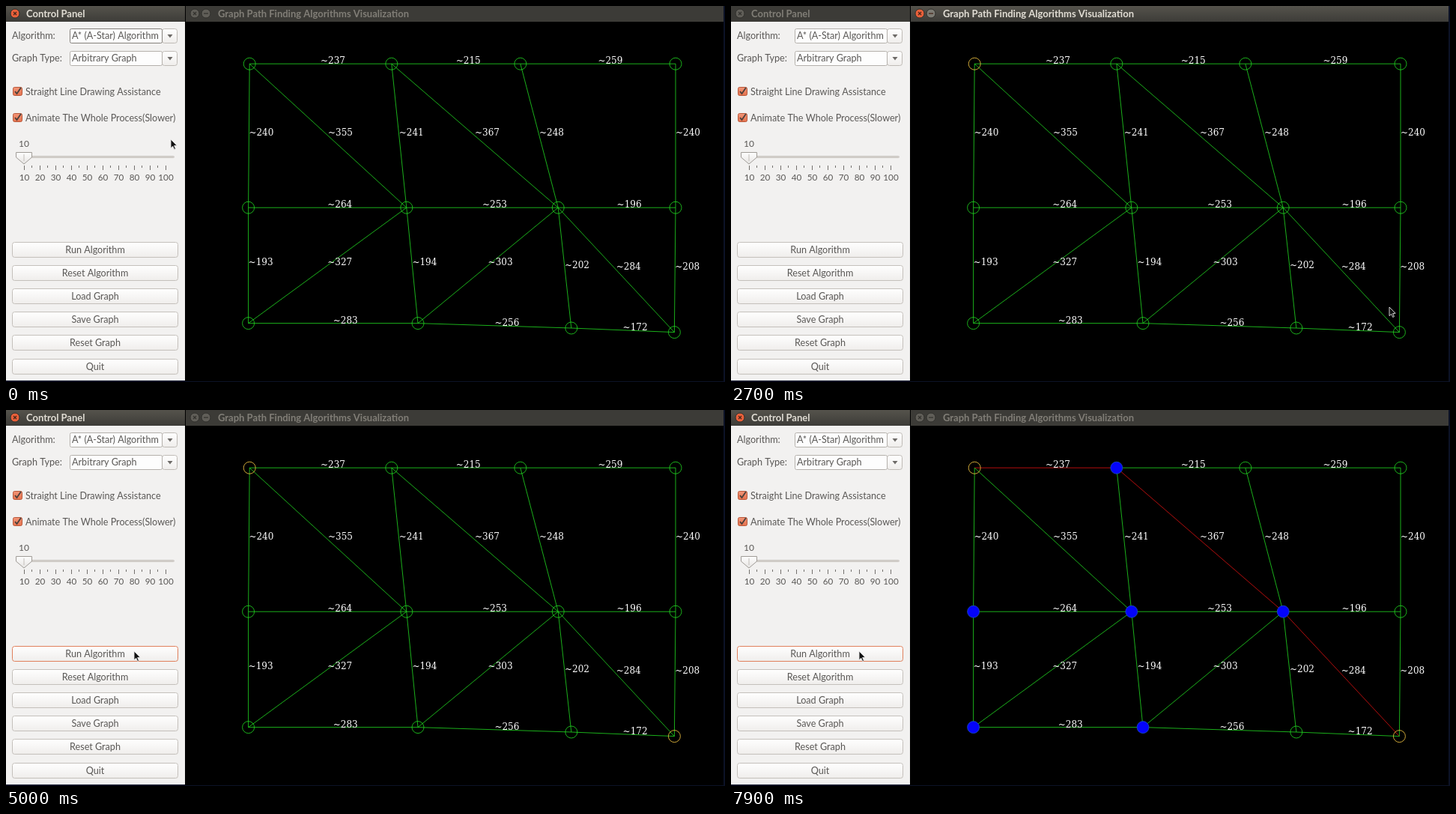
These frames come from a looping animation (960 by 502 pixels, 8 s). An HTML page with a canvas:

```html
<!DOCTYPE html>
<html>
<head>
<meta charset="utf-8">
<title>Graph Path Finding</title>
<style>
html, body { margin: 0; width: 100%; height: 100%; overflow: hidden; background: #000; }
canvas { display: block; }
</style>
</head>
<body>
<canvas id="stage" width="960" height="502"></canvas>
<script>
const ctx = document.getElementById('stage').getContext('2d');
const LOOP = 8000;
const SANS = 'Lato, "Open Sans", sans-serif';
const GREEN = '#22dc22', RED = '#e01212', GOLD = '#ffd046';

// The graph lives in its own units; edge weights are the distances.
const ZOOM = .8;
const nodes = [
  [406, 96], [643, 96], [858, 96], [1117, 96],
  [404, 336], [668, 336], [921, 336], [1117, 336],
  [404, 529], [687, 529], [943, 537], [1115, 544]
];
const edges = [[0, 5], [1, 6], [6, 11], [5, 8], [6, 9]];
nodes.forEach((_, i) => {
  if (i % 4 < 3) edges.push([i, i + 1]);
  if (i < 8) edges.push([i, i + 4]);
});

const path = [0, 1, 6, 11];
const visits = [5, 1, 4, 6, 8, 9];
const visitTime = k => k < 2 ? 5500 + 950 * k : 6850 + 280 * (k - 2);
const PICK_START = 1950, PICK_END = 3000, PRESS = 5000, RUN = 5100;

// pointer legs: start time, end time, x, y
const legs = [
  [350, 1650, 334, 69], [2050, 2700, 879, 402], [2700, 2900, 889, 430],
  [3150, 3900, 198, 362], [4350, 4800, 171, 322]
];

function pointerAt(t) {
  let x = 220, y = 178;
  for (const [from, to, tx, ty] of legs) {
    const u = Math.min(1, Math.max(0, (t - from) / (to - from)));
    const k = u * u * (3 - 2 * u);
    x += (tx - x) * k;
    y += (ty - y) * k;
  }
  return [x, y];
}

function rect(x, y, w, h, fill) {
  ctx.fillStyle = fill;
  ctx.fillRect(x, y, w, h);
}

function shade(y, h, top, bottom) {
  const g = ctx.createLinearGradient(0, y, 0, y + h);
  g.addColorStop(0, top);
  g.addColorStop(1, bottom);
  return g;
}

function paint(fill, stroke, width = 1) {
  if (fill) { ctx.fillStyle = fill; ctx.fill(); }
  if (stroke) { ctx.strokeStyle = stroke; ctx.lineWidth = width; ctx.stroke(); }
}

function box(x, y, w, h, r, fill, stroke) {
  ctx.beginPath();
  ctx.roundRect(x + .5, y + .5, w - 1, h - 1, r);
  paint(fill, stroke);
}

function line(points, color, width) {
  ctx.beginPath();
  points.forEach(p => ctx.lineTo(p[0], p[1]));
  paint(null, color, width);
}

function shape(points, fill, stroke) {
  ctx.beginPath();
  points.forEach(p => ctx.lineTo(p[0], p[1]));
  ctx.closePath();
  paint(fill, stroke);
}

function disc(x, y, r, fill, stroke) {
  ctx.beginPath();
  ctx.arc(x, y, r, 0, Math.PI * 2);
  paint(fill, stroke);
}

function text(s, x, y, align = 'left', color = '#5a5856', size = 12.6, weight = 400) {
  ctx.font = `${weight} ${size}px ${SANS}`;
  ctx.textAlign = align;
  ctx.fillStyle = color;
  ctx.fillText(s, x, y);
}

function titleBar(x, w, title, textX, active, minimise) {
  rect(x, 0, w, 21, active ? shade(0, 21, '#55534c', '#3d3c38') : '#3c3b37');
  const mark = active ? '#45261b' : '#34332f';
  disc(x + 12, 10, 6, active ? '#e9603a' : '#605e58', '#30302c');
  line([[x + 10, 8], [x + 14, 12]], mark, 1.3);
  line([[x + 14, 8], [x + 10, 12]], mark, 1.3);
  if (minimise) {
    disc(x + 27, 10, 6, active ? '#7d7b73' : '#605e58', '#30302c');
    line([[x + 24, 10], [x + 30, 10]], mark, 1.3);
  }
  text(title, textX, 14.5, 'left', active ? '#e2ded5' : '#817e77', 13, 700);
}

function combo(y, label, value, focused) {
  text(label, 8, y + 14);
  box(208, y, 21, 20, 3, shade(y, 20, '#ffffff', '#efedeb'), '#bfbbb6');
  box(85, y, 124, 20, 2, '#fdfdfd', focused ? '#85817c' : '#b4b0ab');
  text(value, 88, y + 14);
  shape([[215.5, y + 8], [222.5, y + 8], [219, y + 12.5]], '#6d6a67');
}

function check(y, label) {
  box(9, y - 6, 13, 12, 2, shade(y - 6, 12, '#f3977a', '#e4704b'), '#b8583a');
  line([[12, y], [14.5, y + 3], [20, y - 5]], '#4a403b', 1.8);
  text(label, 26, y + 4.5);
}

function slider() {
  text('10', 24, 188, 'center', undefined, 12);
  box(13, 200, 212, 3, 1, '#d8d4d0', '#c8c4bf');
  shape([[13.5, 195.5], [34.5, 195.5], [34.5, 202], [24, 211], [13.5, 202]],
    shade(195, 16, '#ffffff', '#e6e4e2'), '#a09c97');
  line([[24, 198], [24, 207]], '#c2beb9');
  for (let i = 0; i <= 18; i++) {
    const x = Math.floor(24 + i * 10.5) + .5, major = i % 2 === 0;
    line([[x, 213], [x, major ? 219 : 216]], '#74716e');
    if (major) text(String(10 + i * 5), x, 233, 'center', undefined, 11.7);
  }
}

function panel(active, pressed) {
  rect(0, 0, 239, 500, '#f2f1f0');
  titleBar(0, 239, 'Control Panel', 27, active, false);
  combo(30, 'Algorithm:', 'A* (A-Star) Algorithm', active && !pressed);
  combo(60, 'Graph Type:', 'Arbitrary Graph', false);
  check(114, 'Straight Line Drawing Assistance');
  check(149, 'Animate The Whole Process(Slower)');
  slider();
  ['Run', 'Reset', 'Load', 'Save', 'Reset', 'Quit'].forEach((verb, i) => {
    const y = Math.round(314.5 + i * 31.2);
    const noun = i < 2 ? ' Algorithm' : i < 5 ? ' Graph' : '';
    box(8, y, 222, 21, 3, shade(y, 21, '#ffffff', '#efedeb'),
      pressed && i === 0 ? '#e0805c' : '#c4c0bb');
    text(verb + noun, 119, y + 14.5, 'center');
  });
}

function graph(t) {
  ctx.save();
  ctx.scale(ZOOM, ZOOM);
  ctx.translate(.5, .5);
  for (const [a, b] of edges) {
    const onPath = t >= RUN && path.includes(a) && path[path.indexOf(a) + 1] === b;
    line([nodes[a], nodes[b]], onPath ? RED : GREEN);
  }
  nodes.forEach(([x, y], i) => {
    const k = visits.indexOf(i);
    const picked = (i === 0 && t >= PICK_START) || (i === 11 && t >= PICK_END);
    if (k >= 0 && t >= visitTime(k)) disc(x, y, 10, '#0404fa', '#1c50c0');
    else disc(x, y, 10, null, picked ? GOLD : GREEN);
  });
  ctx.font = '15px "DejaVu Serif", "Noto Serif", serif';
  ctx.textAlign = 'left';
  ctx.fillStyle = '#fff';
  for (const [a, b] of edges) {
    const [x1, y1] = nodes[a], [x2, y2] = nodes[b];
    const weight = Math.round(Math.hypot(x2 - x1, y2 - y1));
    ctx.fillText('~' + weight, (x1 + x2) / 2, (y1 + y2) / 2);
  }
  ctx.restore();
}

function pointer([x, y]) {
  ctx.save();
  ctx.translate(x, y);
  ctx.scale(.9, .9);
  shape([[0, 0], [0, 13], [3, 10.3], [5.2, 15], [7.2, 14], [5.1, 9.5], [9, 9.2]],
    '#111', '#e8e8e8');
  ctx.restore();
}

function draw(t) {
  const graphActive = t >= PICK_START && t < PRESS;
  rect(0, 0, 960, 502, '#0c1226');
  rect(239, 0, 719, 501, '#000');
  graph(t);
  titleBar(240, 718, 'Graph Path Finding Algorithms Visualization', 283, graphActive, true);
  panel(!graphActive, t >= PRESS);
  pointer(pointerAt(t));
}

function tick(now) {
  draw(now % LOOP);
  requestAnimationFrame(tick);
}
draw(0);
requestAnimationFrame(tick);
</script>
</body>
</html>
```
